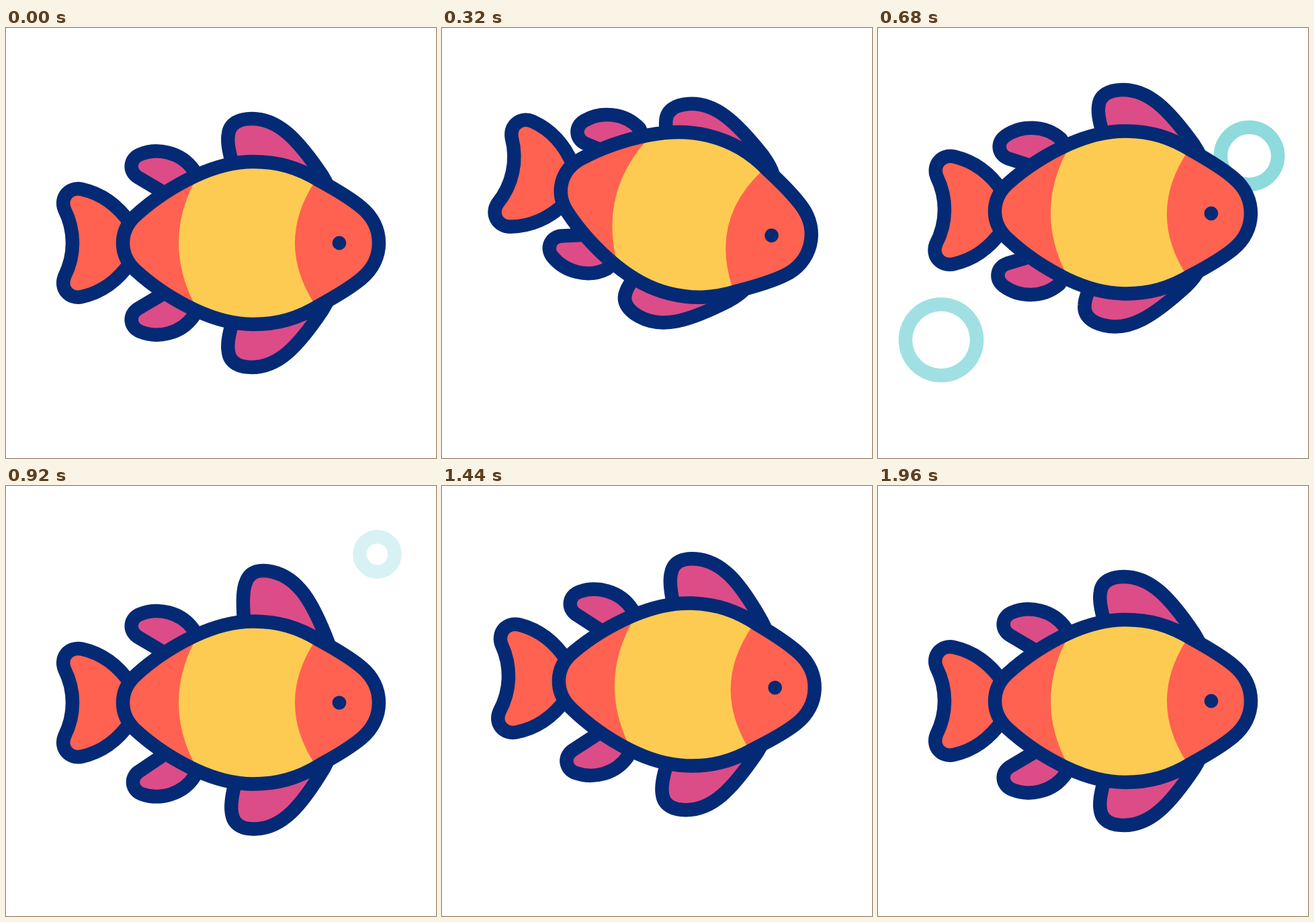
Animation, 640 px wide and 640 px high, one loop 2000 ms. Source, as an HTML page with a canvas:

```html
<!DOCTYPE html>
<html>
<head>
<meta charset="utf-8">
<title>Swimming fish</title>
<style>
html, body { margin: 0; width: 100%; height: 100%; overflow: hidden; background: #fff; }
canvas { display: block; width: 100vmin; height: 100vmin; }
</style>
</head>
<body>
<canvas id="stage" width="640" height="640"></canvas>
<script>
const ctx = document.getElementById('stage').getContext('2d');
const LOOP = 2000, STEP = 40, MID = 320;
const NAVY = '#042a75', CORAL = '#ff6250', GOLD = '#fdcb52', PINK = '#dc4c87', AQUA = '#8edadc';

// Mirror one half of an outline across the fish's long axis.
function mirrored(half) {
  const pts = [];
  for (let i = 0; i < half.length; i += 2) pts.push([half[i], half[i + 1]]);
  const back = pts.slice(0, -1).reverse().map(([x, y]) => [x, 2 * MID - y]);
  const all = pts.concat(back);
  const path = new Path2D();
  path.moveTo(...all[0]);
  for (let i = 1; i < all.length; i += 3) path.bezierCurveTo(...all[i], ...all[i + 1], ...all[i + 2]);
  path.closePath();
  return path;
}

const body = mirrored([
  174, 320, 174, 304, 181, 290, 193, 279, 216, 258, 248, 236, 282, 220,
  310, 207, 338, 199, 368, 199, 404, 199, 434, 207, 468, 228,
  490, 240, 511, 252, 529, 267, 546, 281, 555, 300, 555, 320]);
const tail = mirrored([
  185, 291, 165, 262, 140, 246, 113, 240, 94, 236, 80, 252, 87, 270,
  95, 286, 99, 303, 99, 320]);
const band = new Path2D('M281 228Q233 320 281 412V460H460V412Q400 320 460 228V180H281Z');
const bigFin = new Path2D('M347 240L335 195C331 180 329 168 331 158C333 141 348 135 366 135C405 135 434 165 471 220Q482 238 484 250Z');
const smallFin = new Path2D('M262 262L228 241L196 222C182 213 184 194 200 188C225 178 260 184 279 211L288 240Z');

// Ease in and out from pose to pose, each given as [time, value].
function poses(t, ...keys) {
  let [from, a] = [0, 0];
  for (const [to, b] of keys) {
    if (t < to) return a + (b - a) * (1 - Math.cos(Math.PI * (t - from) / (to - from))) / 2;
    [from, a] = [to, b];
  }
  return a;
}

const lift = t => poses(t, [530, -66], [940, 3], [1400, -25], [1960, 0]);
const tilt = t => poses(t, [245, 15], [750, 0], [940, 0], [1200, 9.4], [1680, -5.2], [1960, 0]);
// A fin folds back on the first stroke, spreads on the second, then rests.
const fold = (t, back, tBack, spread, tSpread) => poses(t, [tBack, -back], [tSpread, spread], [1640, 0]);

function spin(deg, x, y) {
  ctx.translate(x, y);
  ctx.rotate(deg * Math.PI / 180);
  ctx.translate(-x, -y);
}

function part(path, fill, deg, x, y, flip) {
  ctx.save();
  if (flip) {
    ctx.translate(0, 2 * MID);
    ctx.scale(1, -1);
  }
  spin(deg, x, y);
  ctx.fillStyle = fill;
  ctx.fill(path);
  ctx.stroke(path);
  ctx.restore();
}

// Grows quickly, then shrinks and fades while rising.
function bubble(t, start, x, y, size) {
  const grow = 310, shrink = 300;
  const age = t - start, p = age / (grow + shrink);
  if (p <= 0 || p >= 1) return;
  const q = Math.max(0, (age - grow) / shrink);
  const r = age < grow ? size * (1 - (1 - age / grow) ** 2) : size * (1 - q);
  const half = ctx.lineWidth / 2, hole = Math.max(0, r - half);
  const cy = y - 220 * (1 - (1 - p) ** 1.3);
  ctx.globalAlpha = (1 - q) ** 1.75;
  ctx.fillStyle = AQUA;
  ctx.beginPath();
  ctx.arc(x, cy, r + half, 0, 2 * Math.PI);
  ctx.arc(x, cy, hole, 0, 2 * Math.PI, true);
  ctx.fill();
  ctx.globalAlpha = 1;
}

function fish(t) {
  const lean = tilt(t);
  ctx.save();
  ctx.translate(-0.1 * Math.abs(lean), lift(t));
  spin(lean, 364, MID);
  ctx.strokeStyle = NAVY;
  part(tail, CORAL, -0.15 * lean, 185, MID);
  part(smallFin, PINK, fold(t, 27, 440, 0, 920), 279, 245);
  part(smallFin, PINK, fold(t, 19, 490, 12, 1160), 279, 245, true);
  part(bigFin, PINK, fold(t, 21, 410, 13, 920), 425, 265);
  part(bigFin, PINK, fold(t, 20, 480, 6.5, 1060), 425, 265, true);

  ctx.fillStyle = CORAL;
  ctx.fill(body);
  ctx.save();
  ctx.clip(body);
  ctx.fillStyle = GOLD;
  ctx.fill(band);
  ctx.restore();
  ctx.stroke(body);

  ctx.fillStyle = NAVY;
  ctx.beginPath();
  ctx.arc(496, MID, 10.4, 0, 2 * Math.PI);
  ctx.fill();
  ctx.restore();
}

function draw(t) {
  ctx.fillStyle = '#fff';
  ctx.fillRect(0, 0, 640, 640);
  ctx.lineWidth = 20.5;
  ctx.lineJoin = 'round';
  bubble(t, 340, 94, 608, 59);
  bubble(t, 473, 552.5, 282, 48);
  fish(t);
}

const begin = performance.now();
function tick() {
  const t = (performance.now() - begin) % LOOP;
  draw(Math.floor(t / STEP) * STEP);
  requestAnimationFrame(tick);
}
tick();
</script>
</body>
</html>
```
